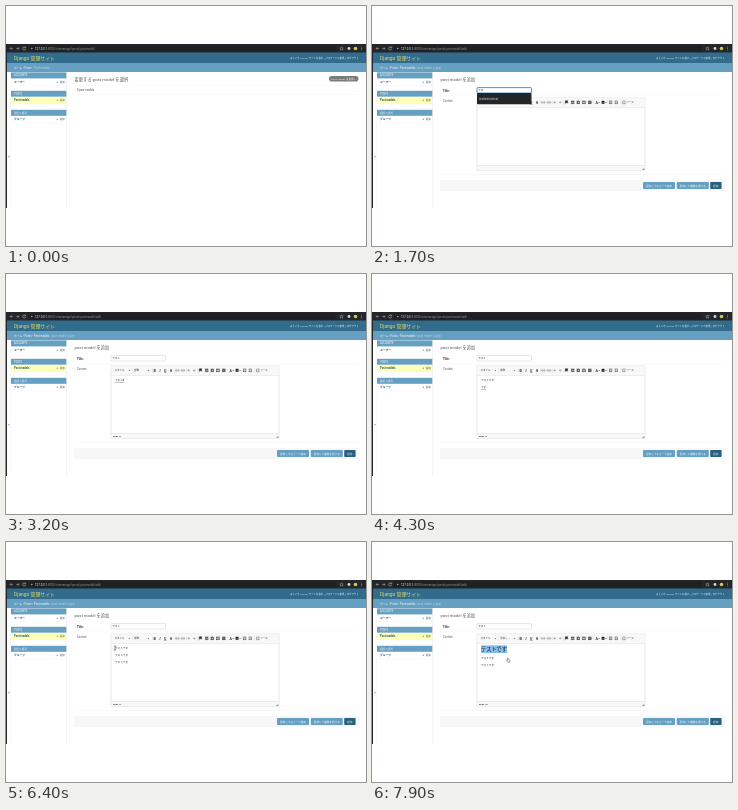
An HTML page that plays this animation: 360 px wide and 240 px high, repeating every 8000 ms.

```html
<!DOCTYPE html>
<html lang="ja">
<head>
<meta charset="utf-8">
<title>Django 管理サイト</title>
<style>
html, body { margin: 0; width: 100%; height: 100%; overflow: hidden; background: #fff; }
svg { display: block; width: 360px; height: 240px; font-family: Roboto, "Noto Sans CJK JP", "Noto Sans CJK", sans-serif; }
text { white-space: pre; }
</style>
</head>
<body>
<svg id="stage" viewBox="0 0 360 240"></svg>
<script>
const NS = 'http://www.w3.org/2000/svg';
const stage = document.getElementById('stage');
const BAR = '#659fc2', DARK = '#326c8c', LINK = '#22546e', INK = '#1c1c1c', RULE = '#ededed';

function add(parent, tag, attrs, content) {
  const el = document.createElementNS(NS, tag);
  for (const key in attrs) el.setAttribute(key, attrs[key]);
  if (content !== undefined) el.textContent = content;
  parent.appendChild(el);
  return el;
}
const group = (parent = stage) => add(parent, 'g', {});
const rect = (p, x, y, width, height, fill, more) => add(p, 'rect', { x, y, width, height, fill, ...more });
const text = (p, x, y, size, fill, str, more) => add(p, 'text', { x, y, 'font-size': size, fill, ...more }, str);
const path = (p, d, stroke, width = 0.5, fill = 'none') => add(p, 'path', { d, stroke, 'stroke-width': width, fill });
const dot = (p, cx, cy, r, fill) => add(p, 'circle', { cx, cy, r, fill });
const show = (el, on) => el.setAttribute('display', on ? 'inline' : 'none');

// Browser bar and window edge
rect(stage, 0, 38, 360, 9, '#242629');
path(stage, 'M7 42.5H4.2M5.4 41.2L4.1 42.5L5.4 43.8M10.2 42.5H13M11.8 41.2L13.1 42.5L11.8 43.8', '#b8babd');
path(stage, 'M19.4 41.6A1.5 1.5 0 1 0 19.6 43M19.6 40.8V41.9H18.5', '#d0d2d4');
rect(stage, 22, 39.6, 308, 6, '#1f2023', { rx: 3 });
dot(stage, 25.8, 42.5, 0.8, '#aaa');
text(stage, 29, 43.6, 2.9, '#eee', '127.0.0.1');
const url = text(stage, 41.2, 43.6, 2.9, '#8d9094', '');
path(stage, 'M335.5 40.8L336 42L337.3 42.1L336.3 43L336.6 44.2L335.5 43.5L334.4 44.2L334.7 43L333.7 42.1L335 42Z', '#c4c6c8', 0.4);
dot(stage, 343, 42.5, 1.4, '#d7d8da');
dot(stage, 349.5, 42.5, 1.8, '#d5c94c');
for (const y of [41, 42.5, 44]) dot(stage, 355.5, y, 0.4, '#ccc');

// Header and breadcrumbs
rect(stage, 0, 46.5, 360, 10.5, DARK);
text(stage, 8, 54, 4.9, '#dfdc68', 'Django 管理サイト');
text(stage, 352.6, 53, 2.4, '#f2f7f9', 'ようこそ ADMIN. サイトを表示 / パスワードの変更 / ログアウト', { 'text-anchor': 'end' });
rect(stage, 0, 57, 360, 9, BAR);
const crumbs = text(stage, 8, 62.6, 2.8, '#fff', '');
const crumbLinks = add(crumbs, 'tspan', {});
const crumbHere = add(crumbs, 'tspan', { fill: '#b7d4e3' });
rect(stage, 0, 38, 1, 164, '#242629');

// Sidebar
function moduleBox(y, caption, item, current) {
  rect(stage, 5, y, 55.5, 6, BAR);
  text(stage, 8, y + 4, 2.6, '#fff', caption);
  if (current) rect(stage, 5, y + 6, 55.5, 7, '#ffffb8');
  text(stage, 8, y + 10.6, 2.75, LINK, item, { 'font-weight': 700 });
  text(stage, 50.4, y + 10.6, 2.9, '#58a01f', '+', { 'font-weight': 700 });
  text(stage, 53.8, y + 10.6, 2.5, LINK, '追加', { 'font-weight': 500 });
  rect(stage, 5, y + 13, 55.5, 0.3, RULE);
}
moduleBox(66.4, 'ACCOUNTS', 'ユーザー');
moduleBox(84.8, 'POSTS', 'Post models', true);
moduleBox(103.8, '認証と認可', 'グループ');
rect(stage, 4.6, 66, 0.3, 136, '#eee');
rect(stage, 60.6, 66, 0.4, 136, '#e4e4e4');
text(stage, 2, 151.9, 4, '#444', '«');

// List page
const list = group();
text(list, 68.5, 74.5, 4.3, '#555', '変更する post model を選択');
rect(list, 323, 70, 29.5, 5.6, '#7b7b7b', { rx: 2.8 });
text(list, 325.1, 73.7, 2.4, '#fff', 'POST MODEL を追加 +');
rect(list, 68, 79.6, 285, 0.3, RULE);
text(list, 71, 85.2, 2.7, '#444', '0 post models');
rect(list, 68, 88, 285, 0.3, RULE);

// Add form
const form = group();
text(form, 68.5, 74.5, 4.2, '#555', 'post model を追加');
text(form, 71, 86, 2.8, INK, 'Title:', { 'font-weight': 700 });
text(form, 71, 96, 2.7, '#555', 'Content:');
rect(form, 68, 89.8, 285, 0.3, RULE);
rect(form, 68, 168, 285, 0.3, RULE);
const input = rect(form, 105, 81.6, 54.5, 5.4, '#fff', { rx: 0.8 });
const title = text(form, 106.2, 85.4, 2.7, INK, '', { 'font-weight': 500 });
rect(form, 68, 174, 285, 11, '#f7f7f7');
function button(x, w, fill, label) {
  rect(form, x, 176, w, 7, fill, { rx: 0.8 });
  text(form, x + w / 2, 180.5, 2.6, '#fff', label, { 'text-anchor': 'middle', 'font-weight': 500 });
}
button(271, 32, BAR, '保存してもう一つ追加');
button(304.8, 32, BAR, '保存して編集を続ける');
button(338.2, 11.4, '#29607e', '保存');

// Rich text editor
rect(form, 105, 92, 168, 72.5, '#fff', { stroke: '#cfcfcf', 'stroke-width': 0.5 });
rect(form, 105.2, 92.2, 167.6, 9, '#f8f8f8');
rect(form, 105, 101, 168, 0.4, '#d3d3d3');
rect(form, 105.2, 159.2, 167.6, 5.1, '#f8f8f8');
rect(form, 105, 159, 168, 0.4, '#d3d3d3');
path(form, 'M272.3 161.7V164H270Z', 'none', 0, '#999');

const arrow = x => path(form, `M${x} 96h1.6l-.8 .9z`, 'none', 0, '#444');
text(form, 108.5, 97.3, 2.5, '#333', 'スタイル');
arrow(122.6);
const format = text(form, 128.3, 97.3, 2.5, '#333', '標準');
arrow(141.6);
const tools = [[148.6, 'B', { 'font-weight': 700 }], [154, 'I', { 'font-style': 'italic' }],
  [159.3, 'U', { 'text-decoration': 'underline' }], [165, 'S', { 'text-decoration': 'line-through' }],
  [224.6, 'A', {}]];
for (const [x, letter, style] of tools)
  text(form, x, 97.5, 3.6, '#222', letter, { 'text-anchor': 'middle', 'font-weight': 500, ...style });
for (const x of [126.5, 146, 168, 180, 191.3, 221.5, 235.5, 248.5]) rect(form, x, 94, 0.3, 5, '#ccc');
for (const x of [171.4, 177])
  path(form, `M${x - 0.4} 95.7h-.7a.7 .7 0 0 0 0 1.5h.7M${x + 0.4} 95.7h.7a.7 .7 0 0 1 0 1.5h-.7M${x - 0.6} 96.4h1.2`, '#666');
for (const x of [183, 188.6]) path(form, `M${x - 1} 96.4h2M${x - 0.2} 95.3L${x - 1.1} 96.4L${x - 0.2} 97.5`, '#666');
path(form, 'M193.3 98.2V94.8H196L195.3 95.8L196 96.8H193.3', '#222', 0.4, '#222');
for (const x of [200.7, 206.3, 212, 217.8, 238.6, 244.4])
  rect(form, x - 1.3, 95, 2.6, 2.8, x < 220 ? '#777' : '#fff', { stroke: '#333', 'stroke-width': 0.5 });
path(form, 'M199.6 97.5L200.7 96L201.8 97.5M210.7 96.4H213.3M212 95V97.8', '#fff', 0.4);
path(form, 'M206 95.7L207 96.4L206 97.1Z', 'none', 0, '#fff');
path(form, 'M237.8 96.4h1.6M243.7 97.1l1.4-1.4', '#444', 0.4);
rect(form, 229.6, 94.8, 2.9, 3, '#222');
text(form, 231, 97.3, 2.5, '#fff', 'A', { 'text-anchor': 'middle' });
arrow(226.4);
arrow(233.2);
rect(form, 250.8, 95, 2.2, 2.9, '#fff', { stroke: '#444', 'stroke-width': 0.4 });
path(form, 'M251.3 96h1.2M251.3 97h1.2', '#555', 0.3);
text(form, 254.4, 97.3, 2.5, '#333', 'ソース');

const marked = rect(form, 109, 104.4, 13, 4, '#86bae8');
const lines = [0, 1, 2].map(() => text(form, 109, 0, 2.6, INK, ''));
const status = text(form, 107, 163, 2.4, '#333', '', { 'font-weight': 700 });

// Suggestion box under the title
const suggest = group(form);
rect(suggest, 105, 87, 54.5, 11.2, '#20262a', { rx: 0.8 });
text(suggest, 107, 93.9, 2.8, '#d5d8d8', 'testtesttesttest');

// Paragraph format menu
const menu = group(form);
rect(menu, 127, 101, 46, 50, '#fff', { stroke: '#c9c9c9', 'stroke-width': 0.5 });
rect(menu, 127.2, 101.2, 45.6, 5, '#f3f3f3');
text(menu, 129, 104.6, 2.5, '#555', '段落の書式', { 'font-weight': 700 });
const hover = rect(menu, 127.8, 114, 44.4, 7.6, '#e3effa');
[[2.6, 111], [5.2, 119.6], [3.9, 127.3], [3.1, 133.8], [2.6, 139.5], [2.3, 144.5], [2, 148.8]].forEach(([size, y], i) =>
  text(menu, 129.5, y, size, INK, i ? '見出し ' + i : '標準', { 'font-weight': i ? 700 : 400 }));

// Mouse
const mouse = group();
const beam = path(mouse, 'M-1 -2.2Q0 -2.2 0 -1.5Q0 -2.2 1 -2.2M0 -1.5V1.5M-1 2.2Q0 2.2 0 1.5Q0 2.2 1 2.2', '#222', 0.5);
const hand = path(mouse, 'M-.6 .2V-1.6Q-.1 -2.2 .3 -1.6V-.5L1.6 -.2Q2 0 1.9 .7L1.5 2.1H-.3L-1.6 .5Q-1.4 -.2 -.6 .2Z', '#444', 0.5, '#fff');

const LIST_END = 600, LOOP = 8000, HEADING = 7700;
const titleSteps = [[0, ''], [1300, 't'], [1400, 'て'], [1500, 'てs'], [1600, 'てす'],
  [2000, 'てすt'], [2100, 'てすと'], [2300, 'テスト']];
const typed = ['t', 'て', 'てs', 'てす', 'てすと', 'てすとd', 'てすとで', 'てすとです'];
const lineTimes = [
  [2700, 2800, 2900, 3000, 3100, 3200, 3300, 3500, 3700],
  [4000, 4100, 4200, 4300, 4500, 4600, 4700, 4800, 5000],
  [5400, 5500, 5600, 5700, 5800, 5900, 6000, 6100, 6200]
];
const route = [[6400, 109, 106], [6500, 109, 106], [6900, 122, 106], [7100, 118, 83],
  [7300, 137, 96.5], [7400, 137, 96.5], [7600, 136, 118], [8000, 136, 118]];

const latest = (steps, t) => steps.filter(s => s[0] <= t).pop()[1];

function along(t) {
  const i = Math.max(1, route.findIndex(k => k[0] >= t));
  const [t0, x0, y0] = route[i - 1], [t1, x1, y1] = route[i];
  const p = Math.min(1, Math.max(0, (t - t0) / (t1 - t0)));
  const e = p * p * (3 - 2 * p);
  return [x0 + (x1 - x0) * e, y0 + (y1 - y0) * e];
}

function render(t) {
  const onForm = t >= LIST_END, heading = t >= HEADING;
  show(list, !onForm);
  show(form, onForm);
  url.textContent = ':8000/sitemanage/posts/postmodel/' + (onForm ? 'add/' : '');
  crumbLinks.textContent = onForm ? 'ホーム › Posts › Post models' : 'ホーム › Posts';
  crumbHere.textContent = onForm ? ' › post model を追加' : ' › Post models';

  const focused = t >= 1100 && t < 2500;
  input.setAttribute('stroke', focused ? '#3c86cf' : '#ccc');
  input.setAttribute('stroke-width', focused ? 0.9 : 0.5);
  title.textContent = latest(titleSteps, t);
  show(suggest, t >= 1300 && t < 2000);

  lines.forEach((line, i) => {
    const n = lineTimes[i].filter(k => k <= t).length;
    line.textContent = n > typed.length ? 'テストです' : typed[n - 1] || '';
    line.setAttribute('text-decoration', n && n <= typed.length ? 'underline' : 'none');
    line.setAttribute('y', heading ? [109, 117, 123.6][i] : 107.4 + i * 6.7);
  });
  lines[0].setAttribute('font-size', heading ? 5.2 : 2.6);
  lines[0].setAttribute('font-weight', heading ? 500 : 400);

  const drag = Math.min(1, Math.max(0, (t - 6500) / 400));
  marked.setAttribute('y', heading ? 103.4 : 104.4);
  marked.setAttribute('width', (heading ? 26 : 13) * drag);
  marked.setAttribute('height', heading ? 7.6 : 4);
  format.textContent = heading ? '見出し 1' : '標準';
  status.textContent = t < 2500 ? '' : heading ? 'body  h1' : 'body  p';

  show(menu, t >= 7400 && !heading);
  show(hover, t >= 7600);
  show(mouse, t >= 6400);
  const [x, y] = along(t);
  mouse.setAttribute('transform', `translate(${x} ${y})`);
  show(beam, t < 7200);
  show(hand, t >= 7200);
}

const start = performance.now();
function tick() {
  const t = (performance.now() - start) % LOOP;
  render(Math.floor(t / 100) * 100);
  requestAnimationFrame(tick);
}
tick();
</script>
</body>
</html>
```
